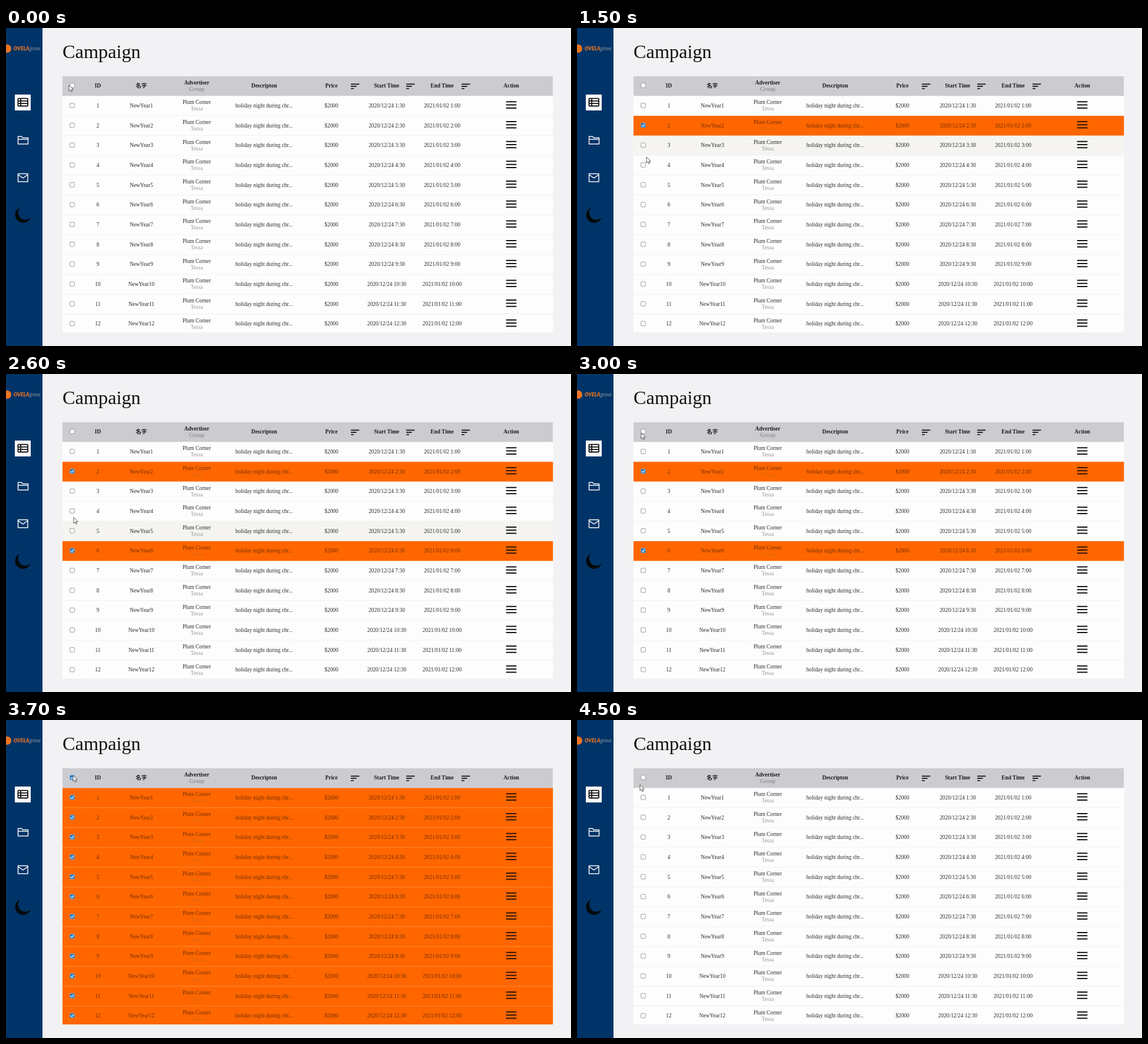
An HTML page that plays this animation: 960 px wide and 540 px high, repeating every 4600 ms.

```html
<!DOCTYPE html>
<html lang="en">
<head>
<meta charset="utf-8">
<title>Campaign</title>
<style>
html, body { margin: 0; width: 100%; height: 100%; overflow: hidden; background: #f2f2f4; }
svg { display: block; font: 9.4px "Liberation Serif", "Noto Sans CJK TC", "Noto Sans CJK SC", serif; }
.mid { text-anchor: middle; }
.head { font-weight: bold; fill: #1c1c1e; }
.row { fill: #2c2c2e; }
.group { fill: #98989a; }
.bg { fill: #fdfdfe; }
.edge { stroke: #ececee; }
.box { fill: #fff; stroke: #85858a; stroke-width: .8; }
.tick { fill: none; stroke: #fff; stroke-width: 1.3; visibility: hidden; }
.bar { fill: none; stroke: #151515; stroke-width: 2; }
.hover .bg { fill: #f5f4f1; }
.row.on { fill: #742f00; }
.on .bg { fill: #ff6600; }
.on .edge { stroke: #ff9a40; }
.row.on .group { fill: #d86a10; }
.row.on .bar { stroke: #33160a; }
.on .box { fill: #1470c0; stroke: #8fb8d8; }
.on .tick { visibility: visible; }
</style>
</head>
<body>
<svg width="960" height="540">
  <rect width="62" height="540" fill="#003468"/>
  <circle cx="2" cy="35" r="7" fill="#ef7420"/>
  <svg width="62" height="60">
    <text x="13" y="37.5" font-family="Lato, sans-serif" font-size="8.6" font-style="italic" fill="#8b9499"><tspan font-weight="900" fill="#ef7420">OVELA</tspan>grove</text>
  </svg>
  <rect x="15" y="113" width="27" height="27" fill="#fcfcfc"/>
  <g fill="none" stroke="#111" stroke-width="1.8">
    <rect x="20.4" y="119.7" width="16.6" height="12.8" rx="1"/>
    <path d="M25 120v12M20.4 123.8h16.6M20.4 128.2h16.6"/>
  </g>
  <g fill="none" stroke="#f4f4f6" stroke-width="1.5" stroke-linejoin="round">
    <path d="M20.5 197V184.2h6l2 2.3h9V197zM20.5 189h17"/>
    <path d="M20.5 247.5h16.5v13.5H20.5zM20.5 249l8.3 5.8 8.2-5.8"/>
  </g>
  <path d="M24 304.8A13.6 13.6 0 1 0 42 321.6A12 12 0 0 1 24 304.8z" fill="#050a0c"/>
  <text x="96" y="51" font-size="32.3" fill="#111">Campaign</text>
  <svg id="table" width="930" height="517"></svg>
  <path id="arrow" d="M0 0V10.2L2.4 8L4 11.6L5.7 10.9L4.1 7.3H7.3z" fill="#fff" stroke="#333" stroke-width=".8"/>
  <path id="hand" d="M0 7V1Q0 0 1 0T2 1V5L7 6Q8 6.3 8 7.5L7.3 13H1.5L-2.2 8.2Q-1.5 6.5 0 8z" fill="#fff" stroke="#333" stroke-width=".8"/>
</svg>
<script>
const LOOP = 4600, COUNT = 12, TOP = 115.5, PITCH = 33.68;
const table = document.getElementById('table');
const arrow = document.getElementById('arrow');
const hand = document.getElementById('hand');

const label = (x, y, s, cls = '') => `<text class="mid ${cls}" x="${x}" y="${y}">${s}</text>`;
const checkbox = y => `<rect class="box" x="108.7" y="${y - 3.8}" width="7.6" height="7.6" rx="1.3"/>
  <path class="tick" d="M110.3 ${y}l1.7 1.8 3-3.8"/>`;
const sortIcon = x => `<path class="bar" style="stroke-width:1.7" d="M${x} 95.3h14.3M${x} 99.2h9.5M${x} 103h5"/>`;

function header() {
  const titles = [[156, 'ID'], [230, '名字'], [438.5, 'Descripton'], [553, 'Price'],
    [646.7, 'Start Time'], [741, 'End Time'], [858.5, 'Action']];
  return `<g class="head"><rect x="96" y="82" width="833" height="33.5" fill="#cccbd0"/>
    ${checkbox(97.6)}${titles.map(([x, s]) => label(x, 101.3, s)).join('')}
    ${label(324, 95.8, 'Advertiser')}${label(324, 106.8, 'Group', 'group')}
    ${[586, 680, 774].map(sortIcon).join('')}</g>`;
}

function row(i) {
  const n = i + 1;
  return `<g class="row" transform="translate(0 ${i * PITCH})">
    <rect class="bg" x="96" y="${TOP}" width="833.3" height="${PITCH}"/>
    <path class="edge" d="M96 149h833"/>
    ${checkbox(131.5)}
    ${label(156, 135, n)}${label(230, 135, 'NewYear' + n)}
    ${label(324, 129.3, 'Plum Corner')}${label(324, 140.3, 'Tessa', 'group')}
    ${label(438.5, 135, 'holiday night during chr...')}${label(553, 135, '$2000')}
    ${label(647, 135, `2020/12/24 ${n}:30`)}${label(741, 135, `2021/01/02 ${n}:00`)}
    <path class="bar" d="M849.7 125.3h17.6M849.7 130.6h17.6M849.7 135.9h17.6"/></g>`;
}

table.innerHTML = header() + Array.from({ length: COUNT }, (_, i) => row(i)).join('');
const [head, ...rows] = table.children;

// pointer stops: time, x, y
const stops = [[0, 107, 97], [300, 108, 108], [800, 113, 161], [1200, 113, 161], [1500, 118, 219],
  [1900, 117, 293.5], [2400, 117, 293.5], [3000, 109, 100], [3300, 114, 94], [4200, 114, 94], [4500, 107, 110]];

function pointer(t) {
  if (t <= 0) return stops[0].slice(1);
  const k = stops.findIndex(s => s[0] >= t);
  const [t0, x0, y0] = stops[k - 1], [t1, x1, y1] = stops[k];
  const u = (t - t0) / (t1 - t0), e = u * u * (3 - 2 * u);
  return [x0 + (x1 - x0) * e, y0 + (y1 - y0) * e];
}

const rowAt = y => Math.floor((y - TOP) / PITCH);

function draw(t) {
  const [x, y] = pointer(t);
  const hovered = rowAt(pointer(t - 100)[1]);
  const all = t >= 3700 && t < 4300;
  head.classList.toggle('on', all);
  rows.forEach((el, i) => {
    const picked = i === 1 && t >= 1000 || i === 5 && t >= 2300;
    el.classList.toggle('on', all || picked && t < 3700);
    el.classList.toggle('hover', i === hovered && !el.classList.contains('on'));
  });
  const r = rowAt(y);
  const overBox = r >= 0 && x > 107 && x < 118 && Math.abs(y - 131.5 - r * PITCH) < 8;
  arrow.style.display = overBox ? 'none' : '';
  hand.style.display = overBox ? '' : 'none';
  (overBox ? hand : arrow).setAttribute('transform', `translate(${x + (overBox ? 1 : 0)} ${y})`);
}

function tick() {
  draw(Math.floor(performance.now() % LOOP / 100) * 100);
  requestAnimationFrame(tick);
}
tick();
</script>
</body>
</html>
```
